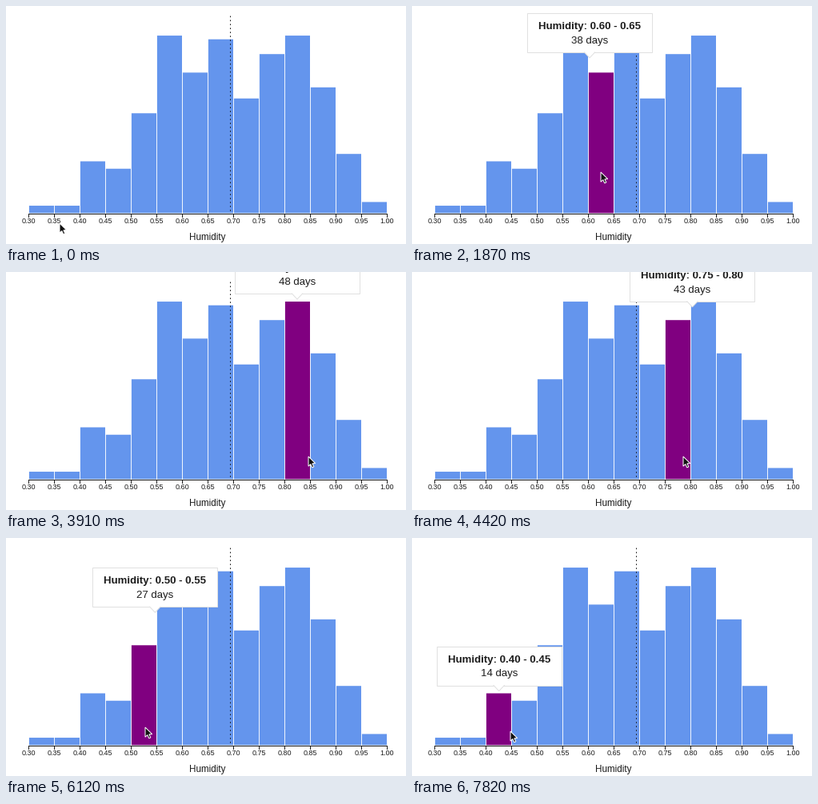
A matplotlib script for the animation above (8 s loop, 500 by 298 pixels).

```python
import numpy as np
import matplotlib.pyplot as plt
from matplotlib.animation import FuncAnimation
from matplotlib.patches import Polygon, Rectangle

W, H, DPI = 500, 298, 100
LOOP, TICK, STEP = 8000, 20, 170      # ms: loop, drawing interval, pose length
POSES = 47
LEFT, BASE, BIN = 28, 259.3, 32
COUNTS = [2, 2, 14, 12, 27, 48, 38, 47, 31, 43, 48, 34, 16, 3]   # days per bin
TOPS = [BASE - 4.63 * n for n in COUNTS]
BLUE, PURPLE, INK, EDGE = "#6495ed", "#800080", "#1c1c1c", "#e0e0e0"
TIP_W, TIP_H, TIP_GAP = 156, 49, 10

# Turning points of the pointer: pose, x, y
KEYS = np.array([
    (0, 67, 272), (2, 88, 268), (4, 124, 243), (6, 143, 239),
    (7, 190, 226), (10, 219, 212), (11, 236, 208), (13, 381, 221), (17, 402, 225),
    (19, 489, 230), (22.9, 489, 230), (23, 378, 231), (25, 354, 231), (26, 339, 231),
    (29, 322, 230), (30, 322, 230), (32, 216, 234), (35, 188.5, 236), (36, 174, 237),
    (44, 106, 244), (46, 123, 242),
])

plt.rcParams["font.family"] = "Liberation Sans"


def px(size):
    return size * 72 / DPI


def pointer(t):
    return np.array([np.interp(t, KEYS[:, 0], KEYS[:, c]) for c in (1, 2)])


def hovered(x, y):
    i = int((x - LEFT) // BIN)
    if 0 <= i < len(COUNTS) and TOPS[i] <= y <= BASE:
        return i
    return None


def simulate(sub=10):
    """Pose list of (pointer, hovered bin, tooltip anchor); the tooltip eases to its bin."""
    keep = 0.4 ** (1 / sub)
    tip, poses = None, []
    for k in range((POSES - 1) * sub + 1):
        pos = pointer(k / sub)
        i = hovered(*pos)
        if i is None:
            tip = None
        else:
            rest = np.array([LEFT + BIN * (i + 0.5), TOPS[i] - TIP_GAP - TIP_H])
            tip = rest if tip is None else rest + (tip - rest) * keep
        if k % sub == 0:
            poses.append((pos, i, tip))
    return poses


poses = simulate()

fig = plt.figure(figsize=(W / DPI, H / DPI), dpi=DPI, facecolor="white")
ax = fig.add_axes([0, 0, 1, 1])
ax.set_xlim(0, W)
ax.set_ylim(H, 0)
ax.axis("off")


def label(x, y, text, size, z=3, **kw):
    return ax.text(x, y, text, fontsize=px(size), ha="center", va="baseline",
                   color=INK, zorder=z, **kw)


def line(x, y, z=3, **kw):
    ax.plot(x, y, color=INK, lw=px(1), zorder=z, **kw)


bars = [ax.add_patch(Rectangle((LEFT + BIN * i + 0.9, top), BIN - 0.9, BASE - top,
                               fc=BLUE, lw=0, snap=False, zorder=1))
        for i, top in enumerate(TOPS)]

# Mean marker, then the axis
line([280, 280], [11.5, BASE], z=2, dashes=(1.65, 3.3), dash_capstyle="butt")
line([LEFT, LEFT + BIN * len(COUNTS)], [260, 260])
for i in range(len(COUNTS) + 1):
    x = LEFT + BIN * i
    line([x, x], [260, 264])
    label(x + 0.5, 272.5, f"{0.3 + 0.05 * i:.2f}", 9)
label(251.5, 293, "Humidity", 11.6)

panel = ax.add_patch(Rectangle((0, 0), TIP_W, TIP_H, fc="white", ec=EDGE,
                               lw=px(1), zorder=5))
arrow = ax.add_patch(Polygon([(0, 0)] * 3, closed=False, fc="white", ec=EDGE,
                             lw=px(1), zorder=6))
title = label(0, 0, "", 13.2, 7, weight="bold")
days = label(0, 0, "", 13.2, 7)
tooltip = [panel, arrow, title, days]

CURSOR = np.array([(0, 0), (0, 12.2), (2.8, 9.6), (4.7, 13.8), (6.8, 12.9),
                   (4.9, 8.8), (8.7, 8.6)])
cursor = ax.add_patch(Polygon(CURSOR, fc="#111111", ec="white", lw=px(1),
                              joinstyle="miter", zorder=8))


def place_tooltip(i, tip):
    for part in tooltip:
        part.set_visible(i is not None)
    if i is None:
        return
    x, y = tip
    foot = y + TIP_H
    low = 0.3 + 0.05 * i
    panel.set_xy((x - TIP_W / 2, y))
    arrow.set_xy([(x - 7, foot - 0.4), (x, foot + 7), (x + 7, foot - 0.4)])
    title.set_text(f"Humidity: {low:.2f} - {low + 0.05:.2f}")
    days.set_text(f"{COUNTS[i]} days")
    title.set_position((x, y + 20.2))
    days.set_position((x, y + 37.8))


def draw(frame):
    pose = min(POSES - 1, (frame * TICK + TICK // 2) // STEP)
    pos, i, tip = poses[pose]
    for n, bar in enumerate(bars):
        bar.set_facecolor(PURPLE if n == i else BLUE)
    place_tooltip(i, tip)
    cursor.set_xy(CURSOR + pos)
    return [*bars, *tooltip, cursor]


anim = FuncAnimation(fig, draw, frames=LOOP // TICK, interval=TICK,
                     init_func=lambda: draw(0), repeat=True, repeat_delay=0)
plt.show()
```
